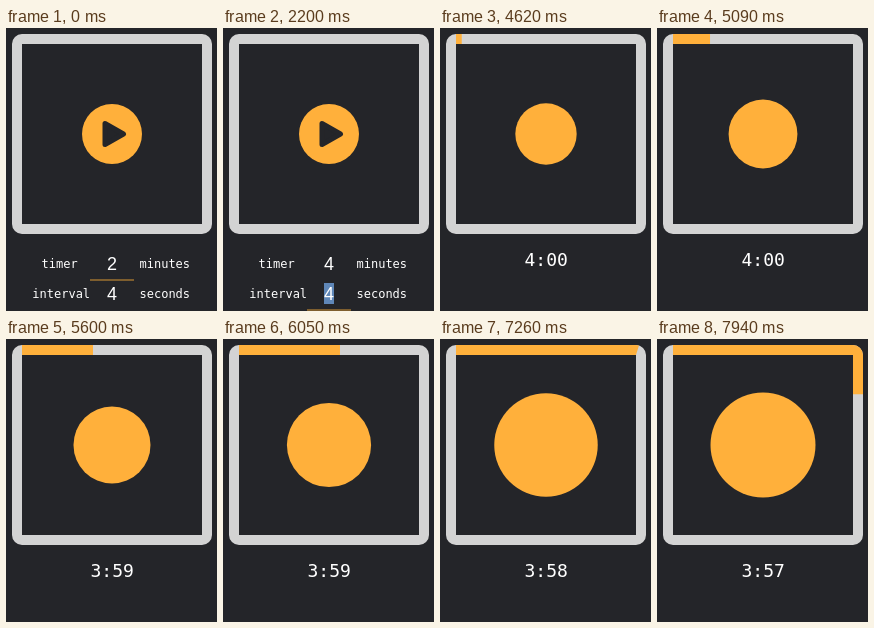
An HTML page for the animation above (8 s loop, 211x283 px).

```html
<!DOCTYPE html>
<html lang="en">
<head>
<meta charset="utf-8">
<title>Breathing timer</title>
<style>
  html, body { margin: 0; width: 100%; height: 100%; overflow: hidden; background: #242529; }
  svg { display: block; width: 211px; height: 283px; }
  text { fill: #fff; font: 12px "DejaVu Sans Mono", monospace; white-space: pre; }
  .value { font: 18px "Liberation Sans", Arial, sans-serif; }
  #clock { font-size: 18px; text-anchor: middle; }
  .ring { fill: none; stroke: #d3d3d3; stroke-width: 10; }
  #bar { stroke: #ffb03b; }
</style>
</head>
<body>
<svg viewBox="0 0 211 283">
  <rect class="ring" x="11" y="11" width="190" height="190" rx="5"/>
  <rect class="ring" id="bar" x="11" y="11" width="190" height="190" rx="5"/>
  <circle id="ball" cx="106" cy="106" r="30" fill="#ffb03b"/>
  <g id="form">
    <path id="play" d="M99 95.5V116.5L117.5 106Z" fill="#242529" stroke="#242529" stroke-width="5" stroke-linejoin="round"/>
    <text x="35.5" y="240">timer</text>
    <text x="133.5" y="240">minutes</text>
    <text x="26.3" y="270">interval</text>
    <text x="133.5" y="270">seconds</text>
    <rect id="line" x="84" width="44" height="1.2" fill="#b98432"/>
    <rect id="mark" x="101" width="10" height="21" fill="#5f87b8"/>
    <text class="value" id="minutes" x="101" y="242"></text>
    <text class="value" id="seconds" x="101" y="272"></text>
    <rect id="caret" width="1" height="21" fill="#d0d0d0"/>
  </g>
  <text id="clock" x="106.2" y="238"></text>
</svg>
<script>
const LOOP = 8000, SUBMIT = 4160, SWAP = 4570;
const START = 4535, SECOND = 940, INTERVAL = 3 * SECOND;
const SPEED = 0.0666; // bar pixels per ms

const $ = id => document.getElementById(id);
const set = (id, attrs) => {
  for (const k in attrs) $(id).setAttribute(k, attrs[k]);
};
const show = (id, on) => set(id, { visibility: on ? "inherit" : "hidden" });
const within = (t, a, b) => t >= a && t < b;

function drawForm(t) {
  const row = t < 2200 ? 0 : 30;
  const empty = within(t, 1490, 1660);
  $("minutes").textContent = t < 1490 ? "2" : empty ? "" : "4";
  $("seconds").textContent = t < 2980 ? "4" : "3";

  set("line", { y: 251.4 + row });
  show("line", t < SUBMIT);
  set("mark", { y: 225 + row });
  show("mark", within(t, 1370, 1490) || within(t, 2200, 2980));
  set("caret", { x: empty ? 101 : 110.6, y: 225 + row });
  show("caret", within(t, 540, 1020) || within(t, 1490, 2200) ||
    within(t, 2980, 3510) || within(t, 3990, SUBMIT));

  // the button swells slightly when pressed
  const p = Math.min(1, Math.max(0, (t - 4130) / 250));
  const scale = 1 + 0.05 * p * p * (3 - 2 * p);
  set("ball", { r: 30 * scale });
  set("play", { transform: `translate(106 106) scale(${scale}) translate(-106 -106)` });
}

function drawTimer(t) {
  const e = t - START;
  const left = 240 - Math.floor(e / SECOND);
  $("clock").textContent = Math.floor(left / 60) + ":" + String(left % 60).padStart(2, "0");
  set("ball", { r: 30 * (1 + 0.75 * Math.min(1, e / INTERVAL)) });
  set("bar", { "stroke-dasharray": `${e * SPEED} 2000` });
}

function draw(t) {
  const running = t >= SWAP;
  show("form", !running);
  show("clock", running);
  show("bar", running);
  (running ? drawTimer : drawForm)(t);
}

const origin = performance.now();
function frame() {
  draw((performance.now() - origin) % LOOP);
  requestAnimationFrame(frame);
}
frame();
</script>
</body>
</html>
```
